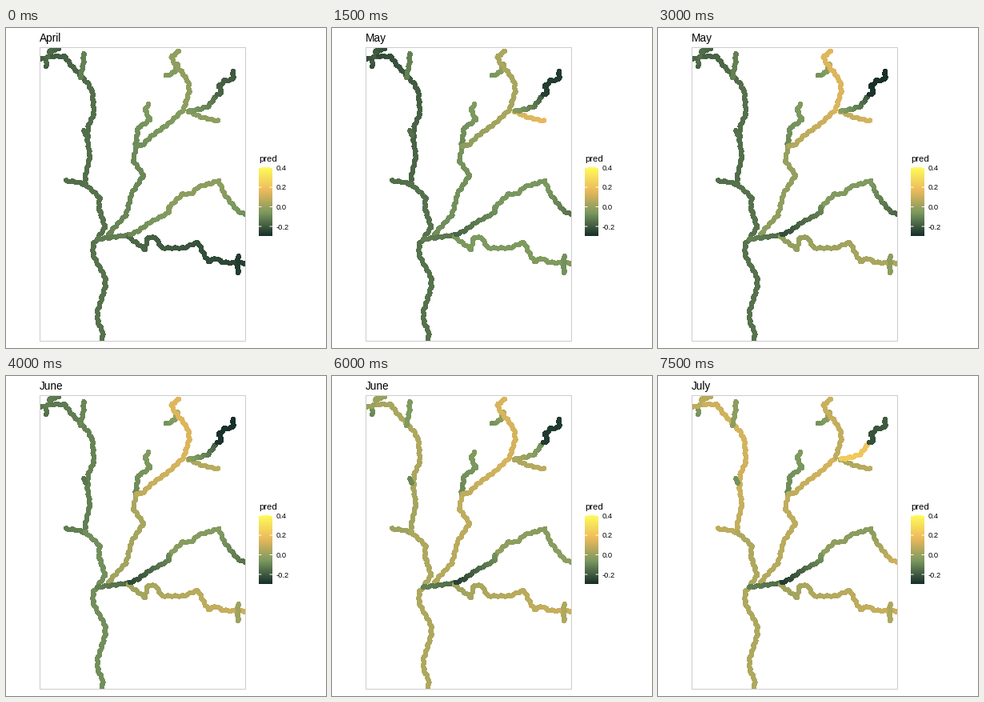
Recreate the animation shown at these times as a matplotlib script. Size 400 by 400 pixels, loop 8 s.

```python
import numpy as np
import matplotlib.pyplot as plt
from matplotlib.animation import FuncAnimation
from matplotlib.colors import LinearSegmentedColormap
from matplotlib.patches import Rectangle

plt.rcParams["font.family"] = "Liberation Sans"
FRAMES, STEP = 16, 500
VMIN, VMAX = -0.3, 0.4
PX = 0.72  # points per pixel at 100 dpi

cmap = LinearSegmentedColormap.from_list(
    "river", ["#172f2a", "#7a985f", "#ecba5c", "#fefb5a"], N=512)
rng = np.random.default_rng(4)
reaches = []


def meander(pts, gap=1.5, swing=0.7, wave=9):
    """Evenly spaced points along a course, swaying from side to side."""
    p = np.array(pts, float)
    d = np.r_[0, np.cumsum(np.hypot(*np.diff(p, axis=0).T))]
    s = np.linspace(0, d[-1], int(d[-1] / gap) + 2)
    x, y = np.interp(s, d, p[:, 0]), np.interp(s, d, p[:, 1])
    dx, dy = np.gradient(x), np.gradient(y)
    sway = swing * np.sin(2 * np.pi * (s / wave + rng.random()))
    sway /= np.hypot(dx, dy)
    return x - dy * sway, y + dx * sway, s / d[-1]


def reach(pts, *states):
    """A course from source to mouth; states are (step, source, mouth)."""
    reaches.append((*meander(pts), np.array(states).T))


# Western river, its headwaters and side streams
warming = (0, -.16, -.16), (7, -.16, -.15)
chill = (0, -.2, -.16), (2, -.27, -.23), (4, -.21, -.16), (7, -.18, -.15)
reach([(50, 48), (51, 40)], *chill, (14, -.08, -.06))
reach([(43, 39), (58, 35)], *chill, (14, .06, .08))
reach([(66, 26), (55, 29), (54, 36)], *chill, (14, .06, .06))
reach([(58, 35), (74, 36), (80, 45), (90, 56), (103, 70), (108, 80)],
      *chill, (14, .1, .12))
reach([(97, 32), (97, 43), (93, 62)], (7, -.12, -.12), (14, -.03, -.03))
reach([(108, 80), (110, 107), (103, 122), (102, 142), (105, 160), (99, 186),
       (99, 195)], (0, -.16, -.16), (2, -.23, -.18), (4, -.16, -.17),
      (7, -.15, -.16), (14, .12, .08))
reach([(75, 191), (90, 193), (100, 196)], *warming, (14, .07, .07))
reach([(98, 128), (99, 134)], *warming, (14, -.08, -.08))

# Main stem
thaw = (7, -.15, -.15), (10, .04, .04)
reach([(99, 195), (117, 212), (116, 225), (124, 249), (114, 264)], *thaw)
reach([(114, 264), (109, 270), (109, 284), (124, 312), (124, 325), (114, 355),
       (115, 368), (121, 380), (120, 392)], *thaw)

# Central valley and its northern arms
reach([(163, 147), (159, 166), (172, 184), (157, 207), (150, 234), (133, 252),
       (126, 262)], (2, -.1, -.11), (10, .08, .05))
reach([(178, 95), (174, 103), (180, 115), (165, 125), (162, 147)],
      (0, -.05, -.1))
reach([(222, 102), (203, 120), (183, 134), (170, 147), (163, 147)],
      (1, -.04, -.09), (5, .12, .03), (8, .13, .07))
reach([(214, 45), (211, 55), (200, 60)], (0, -.04, -.05), (5, .02, -.08))
reach([(216, 29), (207, 36), (209, 42), (222, 58), (228, 68), (229, 80),
       (222, 102)],
      (2, -.02, -.03), (5, .14, .13), (11, .14, .13), (15, .1, .07))

# Eastern headwaters
reach([(265, 116), (258, 115), (243, 111), (228, 104)],
      (0, -.02, -.04), (2, .16, .14), (5, .15, .09), (8, .07, .03))
reach([(262, 86), (253, 98), (240, 102), (229, 104)],
      (0, -.16, -.06), (5, -.22, -.05), (11, -.19, -.03), (15, .2, .23))
reach([(284, 54), (284, 64), (273, 66), (266, 73), (270, 81), (264, 83)],
      (0, -.21, -.18), (4, -.3, -.29), (11, -.3, -.29), (15, -.2, -.23))

# Eastern rivers
reach([(152, 259), (137, 261), (114, 264)], (0, -.12, -.13), (5, -.17, -.12))
reach([(299, 294), (272, 293), (262, 288), (253, 292), (247, 282), (240, 268),
       (222, 275), (195, 275), (187, 262), (177, 262), (174, 277), (153, 261)],
      (0, -.26, -.17), (2, -.08, -.08), (8, .1, .01))
reach([(290, 285), (290, 306)], (0, -.27, -.27), (2, -.1, -.1), (10, .04, .04))
reach([(299, 233), (290, 229), (273, 208), (266, 191)],
      (0, -.09, -.02), (5, -.2, -.07), (10, -.13, -.04), (15, .12, -.04))
reach([(266, 191), (240, 199), (232, 207), (220, 208), (204, 224)],
      (0, -.03, -.03), (3, -.07, -.07), (10, -.04, -.02))
reach([(204, 224), (203, 231), (180, 243), (165, 254), (155, 258)],
      (0, -.04, -.1), (5, -.1, -.23), (15, -.07, -.27))

fig = plt.figure(figsize=(4, 4), dpi=100, facecolor="white")
ax = fig.add_axes([0, 0, 1, 1])
ax.axis("off")

# Colour bar
ax.imshow(np.linspace(VMAX, VMIN, 86)[:, None], cmap=cmap, vmin=VMIN,
          vmax=VMAX, extent=(316, 333, 260, 174), aspect="auto",
          interpolation="nearest")
ax.text(316, 167, "pred", size=11.4 * PX)
for v in (0.4, 0.2, 0.0, -0.2):
    y = 174.5 + (VMAX - v) * 122.5
    for x in (316, 329.6):
        ax.plot([x, x + 3.4], [y, y], color="white", lw=PX, snap=False,
                solid_capstyle="butt")
    ax.text(338, y + 3.5, f"{v:.1f}", size=9.4 * PX)

# Map panel
panel = Rectangle((42.5, 24.5), 257, 367, fill=False, ec="#cccccc", lw=PX,
                  snap=False, zorder=5)
ax.add_patch(panel)
xs, ys = (np.concatenate([r[k] for r in reaches]) for k in (0, 1))
dots = ax.scatter(xs, ys, s=(5.2 * PX) ** 2, linewidths=0, antialiased=False,
                  zorder=3)
dots.set_clip_path(panel)
title = ax.text(42, 16.6, "", size=13.6 * PX)
ax.set(xlim=(0, 400), ylim=(400, 0))


def level(u, states, i):
    """Value along a reach at step i, blended between its states."""
    steps, source, mouth = states
    a, b = np.interp(i, steps, source), np.interp(i, steps, mouth)
    return a + (b - a) * u


def update(i):
    v = np.concatenate([level(u, st, i) for _, _, u, st in reaches])
    dots.set_facecolors(cmap((v - VMIN) / (VMAX - VMIN)))
    month = sum(i >= start for start in (1, 7, 13))
    title.set_text(("April", "May", "June", "July")[month])
    return dots, title


anim = FuncAnimation(fig, update, frames=FRAMES, interval=STEP, repeat=True,
                     repeat_delay=0)
plt.show()
```
